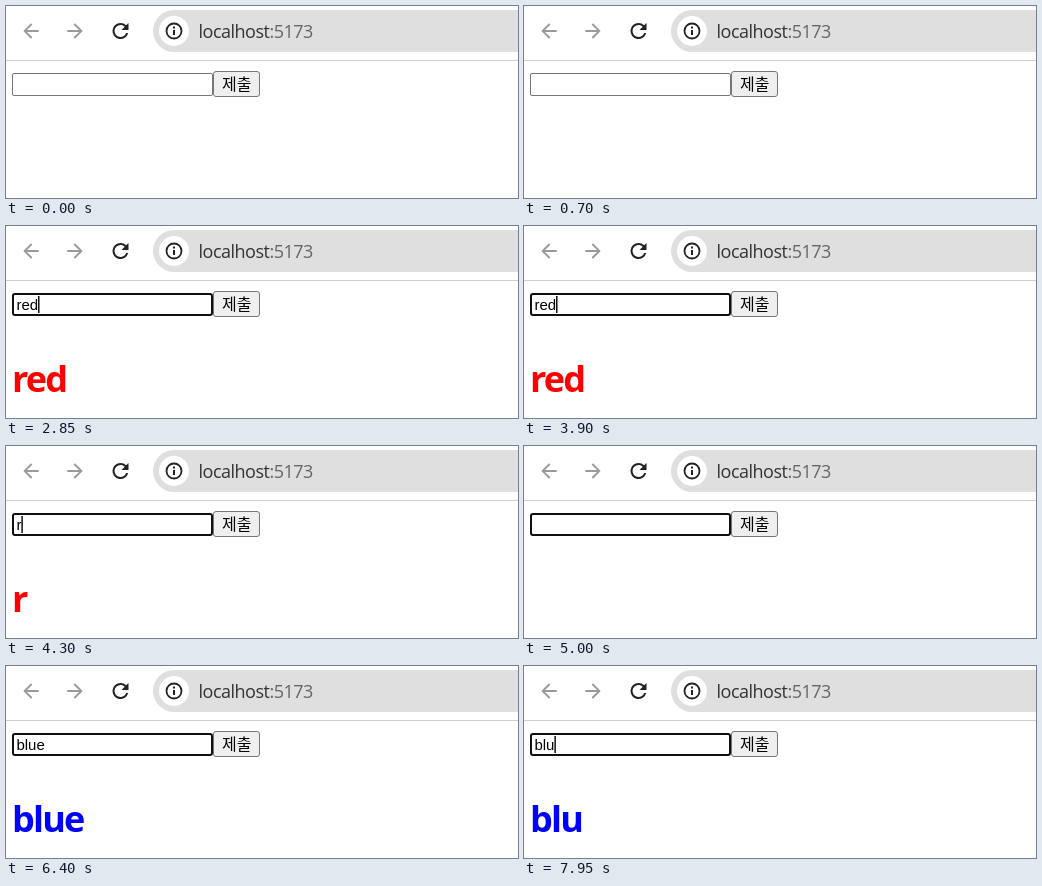
Animation, 512 px wide and 192 px high, one loop 8 s. Source, as an HTML page:

```html
<!DOCTYPE html>
<html lang="ko">
<head>
<meta charset="utf-8">
<style>
  html, body { margin: 0; width: 100%; height: 100%; overflow: hidden; background: #fff; }
  svg { display: block; }
  .url { font: 18px "Open Sans", sans-serif; letter-spacing: -.5px; }
  .field { font: 15px "Liberation Sans", Arial, sans-serif; }
  .button { font: 16px "Noto Sans CJK KR", "Noto Sans CJK", sans-serif; }
  .heading { font: bold 36px "Open Sans", sans-serif; letter-spacing: -1.8px; }
</style>
</head>
<body>
<svg width="512" height="192" viewBox="0 0 512 192">
  <defs>
    <path id="arrow" d="M8 -1H-4.2L1.4 -6.6L0 -8L-8 0L0 8L1.4 6.6L-4.2 1H8Z"/>
  </defs>

  <!-- Browser toolbar -->
  <use href="#arrow" transform="translate(25 25) scale(.96)" fill="#999"/>
  <use href="#arrow" transform="translate(69 25) scale(-.96 .96)" fill="#999"/>
  <path transform="translate(102.5 13)" fill="#222" d="M17.65 6.35A7.96 7.96 0 0 0 12 4a8 8 0 1 0 7.73 10h-2.08A6 6 0 1 1 12 6c1.66 0 3.14.69 4.22 1.78L13 11h7V4z"/>
  <rect x="147" y="4" width="400" height="42" rx="21" fill="#dfdfdf"/>
  <circle cx="168" cy="25" r="15" fill="#fff"/>
  <circle cx="168" cy="25" r="7.5" fill="none" stroke="#222" stroke-width="1.8"/>
  <path d="M168 20.5v2M168 24v5" stroke="#222" stroke-width="2"/>
  <text class="url" x="192.5" y="32" fill="#333">localhost<tspan fill="#666">:5173</tspan></text>
  <path d="M0 54.5H512" stroke="#cfcfcf"/>

  <!-- Page -->
  <rect id="box" fill="#fff"/>
  <text id="typed" class="field" x="10.4" y="84"/>
  <rect id="caret" y="70" width="1.4" height="17"/>
  <rect x="207.5" y="65.5" width="46" height="25" rx="2.5" fill="#efefef" stroke="#767676"/>
  <text class="button" x="230.7" y="84" text-anchor="middle">제출</text>
  <text id="heading" class="heading" x="6" y="166"/>
</svg>
<script>
const LOOP = 8000, FOCUS = 1200, BLINK = 500;

// [time, field value, heading colour]; an invalid colour name keeps the last one
const edits = [
  [0, '', 'black'],
  [2150, 'r', 'black'],
  [2450, 're', 'black'],
  [2850, 'red', 'red'],
  [4050, 're', 'red'],
  [4300, 'r', 'red'],
  [4450, '', 'black'],
  [5250, 'b', 'black'],
  [5650, 'bl', 'black'],
  [5900, 'blu', 'black'],
  [6400, 'blue', 'blue'],
  [7950, 'blu', 'blue'],
];
// Moments at which the caret restarts its blinking
const caretResets = [FOCUS, 1250, 2150, 2450, 2900, 4050, 4300, 4450, 5250, 5650, 5900, 6450, 7950];

const [box, typed, caret, heading] =
  ['box', 'typed', 'caret', 'heading'].map(id => document.getElementById(id));

function setAttrs(el, attrs) {
  for (const name in attrs) el.setAttribute(name, attrs[name]);
}

function draw(t) {
  const [, value, color] = edits.findLast(e => e[0] <= t);
  const focused = t >= FOCUS;
  const reset = caretResets.findLast(r => r <= t);
  const lit = focused && Math.floor((t - reset) / BLINK) % 2 === 0;

  setAttrs(box, focused
    ? { x: 7, y: 68, width: 199, height: 21, rx: 2, stroke: '#101010', 'stroke-width': 2 }
    : { x: 6.5, y: 67.5, width: 200, height: 22, rx: 1.5, stroke: '#767676', 'stroke-width': 1 });
  typed.textContent = heading.textContent = value;
  heading.setAttribute('fill', color);
  setAttrs(caret, {
    x: 10.4 + (value ? typed.getComputedTextLength() : 0),
    visibility: lit ? 'visible' : 'hidden',
  });
}

const start = performance.now();
function tick() {
  draw((performance.now() - start) % LOOP);
  requestAnimationFrame(tick);
}
tick();
</script>
</body>
</html>
```
